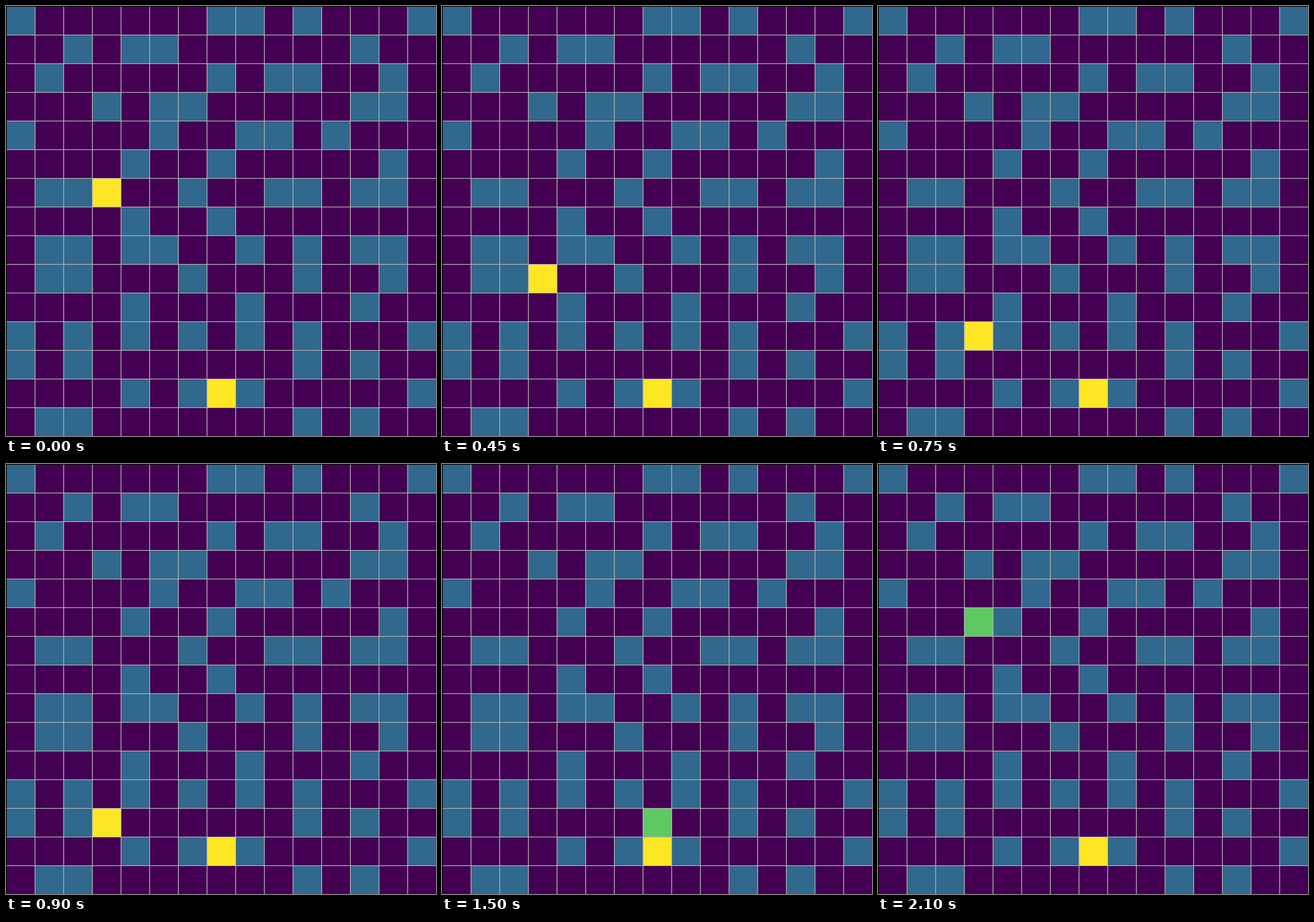
Recreate the animation shown at these times as an HTML page. Size 600 px wide and 600 px high, loop 2250 ms.

```html
<!DOCTYPE html>
<html lang="en">
<head>
<meta charset="utf-8">
<title>Grid walk</title>
<style>
  html, body { margin: 0; width: 100%; height: 100%; overflow: hidden; background: #440154; }
  svg { display: block; width: 600px; height: 600px; }
  #walls { fill: #31688e; }
  #goal { fill: #fde725; }
  #lines { stroke: #b0b0b0; stroke-width: 1.11; }
  #frame { stroke: #000; stroke-width: 1.11; fill: none; }

  /* colour shows the heading: yellow down, green right, lime at the start */
  #agent { animation: walk 2250ms step-end infinite; }
  @keyframes walk {
    0%       { transform: translate(120px, 240px); fill: #fde725; }
    6.6666%  { transform: translate(120px, 280px); fill: #fde725; }
    13.3333% { transform: translate(120px, 320px); fill: #fde725; }
    19.9999% { transform: translate(120px, 360px); fill: #fde725; }
    26.6666% { transform: translate(120px, 400px); fill: #fde725; }
    33.3333% { transform: translate(120px, 440px); fill: #fde725; }
    39.9999% { transform: translate(120px, 480px); fill: #fde725; }
    46.6666% { transform: translate(160px, 480px); fill: #5ec962; }
    53.3333% { transform: translate(200px, 480px); fill: #5ec962; }
    59.9999% { transform: translate(240px, 480px); fill: #5ec962; }
    66.6666% { transform: translate(280px, 480px); fill: #5ec962; }
    73.3333% { transform: translate(280px, 520px); fill: #fde725; }
    79.9999% { transform: translate(80px, 160px); fill: #90d743; }
    86.6666% { transform: translate(80px, 200px); fill: #fde725; }
    93.3333% { transform: translate(120px, 200px); fill: #5ec962; }
    100%     { transform: translate(120px, 240px); fill: #fde725; }
  }
</style>
</head>
<body>
<svg viewBox="0 0 600 600">
  <rect width="600" height="600" fill="#440154"/>
  <path id="walls"/>
  <rect id="goal" x="280" y="520" width="40" height="40"/>
  <rect id="agent" width="40" height="40"/>
  <path id="lines"/>
  <path id="frame" d="M.5 600V.5H600"/>
</svg>
<script>
  const CELL = 40;
  const map = [
    "#......##.#...#",
    "..#.##......#..",
    ".#.....#.##..#.",
    "...#.##.....##.",
    "#....#..##.#...",
    "....#..#.....#.",
    ".##...#..##.##.",
    "....#..#.......",
    ".##.##..#.#.##.",
    ".##...#...#..#.",
    "....#...#...#..",
    "#.#.#.#.#.#...#",
    "#.#.......#.#..",
    "....#.#.#.....#",
    ".##.......#.#.."
  ];

  let walls = "", lines = "";
  map.forEach((row, y) => {
    [...row].forEach((c, x) => {
      if (c === "#") walls += `M${x * CELL} ${y * CELL}h${CELL}v${CELL}h-${CELL}z`;
    });
    const p = y * CELL + 0.5;
    if (y) lines += `M${p} 0V600M0 ${p}H600`;
  });
  document.getElementById("walls").setAttribute("d", walls);
  document.getElementById("lines").setAttribute("d", lines);
</script>
</body>
</html>
```
